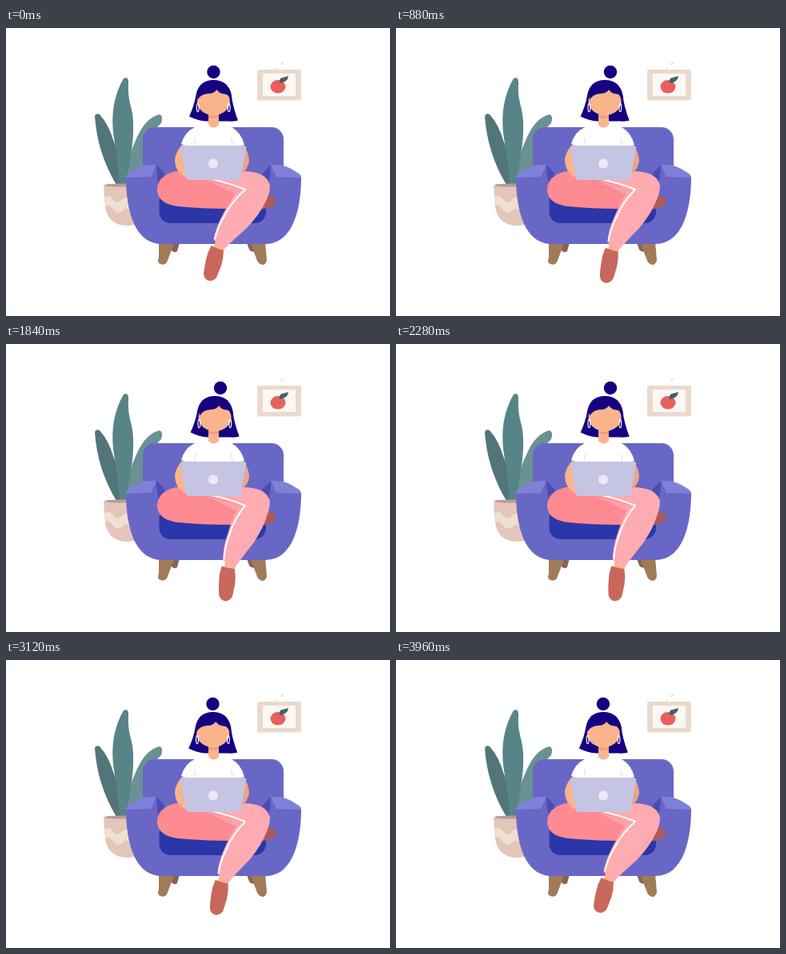
Recreate the animation shown at these times as an HTML page. Size 480 by 360 pixels, loop 4000 ms.

```html
<!DOCTYPE html>
<html lang="en">
<head>
<meta charset="utf-8">
<title>Working from the armchair</title>
<style>
html, body { margin: 0; width: 100%; height: 100%; overflow: hidden; background: #fff; }
svg { display: block; width: 100vw; height: 100vh; }
</style>
</head>
<body>
<svg viewBox="0 0 480 360">
  <g id="plant">
    <path fill="#527579" d="M111 110Q112 106 117 108Q128 120 134 140L146 170V196H138Q114 156 111 110Z"/>
    <path fill="#6a9194" d="M192 108Q197 110 194 119Q183 128 179 150Q172 178 156 192L147 196Q152 160 164 136Q175 112 192 108Z"/>
    <path fill="#578487" d="M147 63Q153 60 153 68Q152 84 156 98Q161 115 158 145Q154 175 149 196H142Q140 165 134.500 135Q129 94 147 63Z"/>
    <path fill="#e3c6b9" d="M122 197H175V233Q169 247 150 247Q128 246 124 224Z"/>
    <ellipse cx="143" cy="196.500" rx="20" ry="2" fill="#b89b97"/>
    <path fill="#f0dfd3" d="M123 212Q128 207 133 213Q139 222 145 214Q151 208 156 216V229Q150 222 145 229Q139 234 133 226Q128 219 124 223Z"/>
  </g>
  <g id="picture">
    <rect x="314" y="52" width="55" height="38.500" rx="2" fill="#eadacd"/>
    <rect x="321" y="57" width="41" height="28" fill="#fbf7f4"/>
    <ellipse cx="340" cy="73.300" rx="9.500" ry="8.300" fill="#e8605d"/>
    <path fill="#416268" d="M342 69Q341 62 346 62L353 60Q352 68 342 69Z"/>
    <path d="M343.500 45.500L346.500 43.500M338 50.500H339.500" stroke="#aaa" stroke-width=".8" fill="none"/>
  </g>
  <g id="chair">
    <path fill="#8a6257" d="M206 268H217L214 279Q210 282 207 278ZM301 268H313L312 279Q307 281 304 277Z"/>
    <path fill="#a17b58" d="M191 267H211L201 293Q197 298 191 294Q189 291 191 287ZM305 267H324L326 290Q325 296 320 296Q316 295 314 291Z"/>
    <rect x="171" y="124" width="176" height="110" rx="15" fill="#6967c6"/>
    <path fill="#4b4cb3" d="M188 171L198 181V226H190ZM331 171L321 181V226H329Z"/>
    <path fill="#6967c6" d="M150 186L187 173L195 222H324L332 173L369 186C369 228 358 270 324 270H195C161 270 150 228 150 186Z"/>
    <path fill="#7f80d8" d="M150 187Q150 183 156 180Q169 171 180 171H188L181 186ZM369 187Q369 183 363 180Q350 171 339 171H331L338 186Z"/>
    <rect x="191.500" y="204" width="133.500" height="40" rx="14" fill="#2b36a8"/>
  </g>
  <g id="body">
    <path fill="#ab5b5b" d="M316 209L333 210Q340 215 335 222Q327 227 316 226Z"/>
    <path fill="#fe8a92" d="M220 178H292Q318 184 315 205Q310 226 282 226Q245 226 215 223C199 221 189 214 189 202C189 189 200 180 220 178Z"/>
    <path fill="#fea0a7" d="M250 190L299 202L286 208Q270 199 250 190Z"/>
    <path fill="#feabb1" d="M254 188.500Q270 181 292 179Q326 178 330 197Q330 210 322 220L287 207L299 202Z"/>
    <g id="shin">
      <path fill="#f9b48c" d="M263 264L275 273L270 282L259 276Z"/>
      <path fill="#c8675b" d="M256.500 272Q264 276 272 278Q272 288 269 297L264 310Q261 316 254.500 316Q247.500 315 247 307Q248 298 250 290Q252 280 256.500 272Z"/>
      <path fill="#feabb1" d="M325 205Q329 208 325 216Q318 232 301 250Q284 265 273 276Q266 273 259.500 264.500Q262 250 270 235Q277 221 288 206Z"/>
      <path d="M299 202Q282 217 273 235Q264 250 261 264" fill="none" stroke="#fff" stroke-width="2"/>
    </g>
    <path d="M254 188.500Q280 194 299 202" fill="none" stroke="#fff" stroke-width="2" stroke-linecap="round"/>
    <path fill="#f9b48c" d="M221 145H238V186H222Q211 178 211 164Q213 153 221 145Z"/>
    <path fill="#eca584" d="M280 145H296Q304 156 304 166Q303 177 292 184H280Z"/>
    <path fill="#fff" d="M236 124Q244 122 252 122H267Q277 122 283 124.500Q294 131 298 146L282 150H236L219 145Q223 130 236 124Z"/>
    <path d="M237 137Q235 142 235 148M281 137Q283 142 283 148" fill="none" stroke="#dedde8" stroke-width="1"/>
    <path fill="#c5c4e3" d="M221 147H297Q301 147 300 151L294 186Q293 190 289 190H229Q225 190 224.500 186L218 151Q218 147 221 147Z"/>
    <circle cx="259" cy="169.500" r="6" fill="#ece8f7"/>
  </g>
  <g id="head">
    <path fill="#160080" d="M237.500 84Q241 65 259.500 65Q278 65 282 84Q283 97 290 115.500Q287 117 278 116.500H250Q240 116 229 110.500Q235 98 237.500 84Z"/>
    <ellipse cx="259.500" cy="92" rx="20.500" ry="17" fill="#f9b48c"/>
    <path id="fringe" fill="#160080" d="M239 90Q238 71 259 71Q279 71 281 90Q279 83.500 273 82.500Q266 82 263 77Q260 82 252 82Q243 82.500 239 90Z"/>
    <g fill="none" stroke="#fff" stroke-width="1.200">
      <ellipse cx="239.800" cy="99.500" rx="1.400" ry="5.200"/>
      <ellipse cx="278.700" cy="99.500" rx="1.400" ry="5.200"/>
    </g>
  </g>
  <path id="neck" fill="#f9b48c" d="M253 108H266V121Q263 124.500 259.500 124.500Q256 124.500 253 121Z"/>
  <path id="chin" fill="#ee9d80" d="M253 109Q259 110.500 266 109V111.500Q259 114 253 111.500Z"/>
  <circle id="bun" cx="258.500" cy="55" r="8.200" fill="#160080"/>
</svg>
<script>
const LOOP = 4000;
const $ = id => document.getElementById(id);
const shin = $("shin"), head = $("head"), fringe = $("fringe"), bun = $("bun");

const ease = (t, from, to) => {
  const p = Math.min(1, Math.max(0, (t - from) / (to - from)));
  return p * p * (3 - 2 * p);
};

// 0 to 1 and back; the turn starts just before the loop wraps
const turn = (t, lead) =>
  ease(t, -lead, 500) - ease(t, 2400, 3040) + ease(t, LOOP - lead, LOOP + 500);

const shift = (el, x) => el.setAttribute("transform", `translate(${x.toFixed(3)} 0)`);

function draw(t) {
  const swing = (1 - Math.cos(2 * Math.PI * t / LOOP)) / 2;
  shin.setAttribute("transform", `rotate(${(-10.1 * swing).toFixed(3)} 296 200)`);
  const look = turn(t, 300);
  shift(head, -0.8 + 2.4 * look);
  shift(fringe, 1.5 * look);
  shift(bun, 9.5 * turn(t, 120));
}

function tick() {
  draw(performance.now() % LOOP);
  requestAnimationFrame(tick);
}
tick();
</script>
</body>
</html>
```
